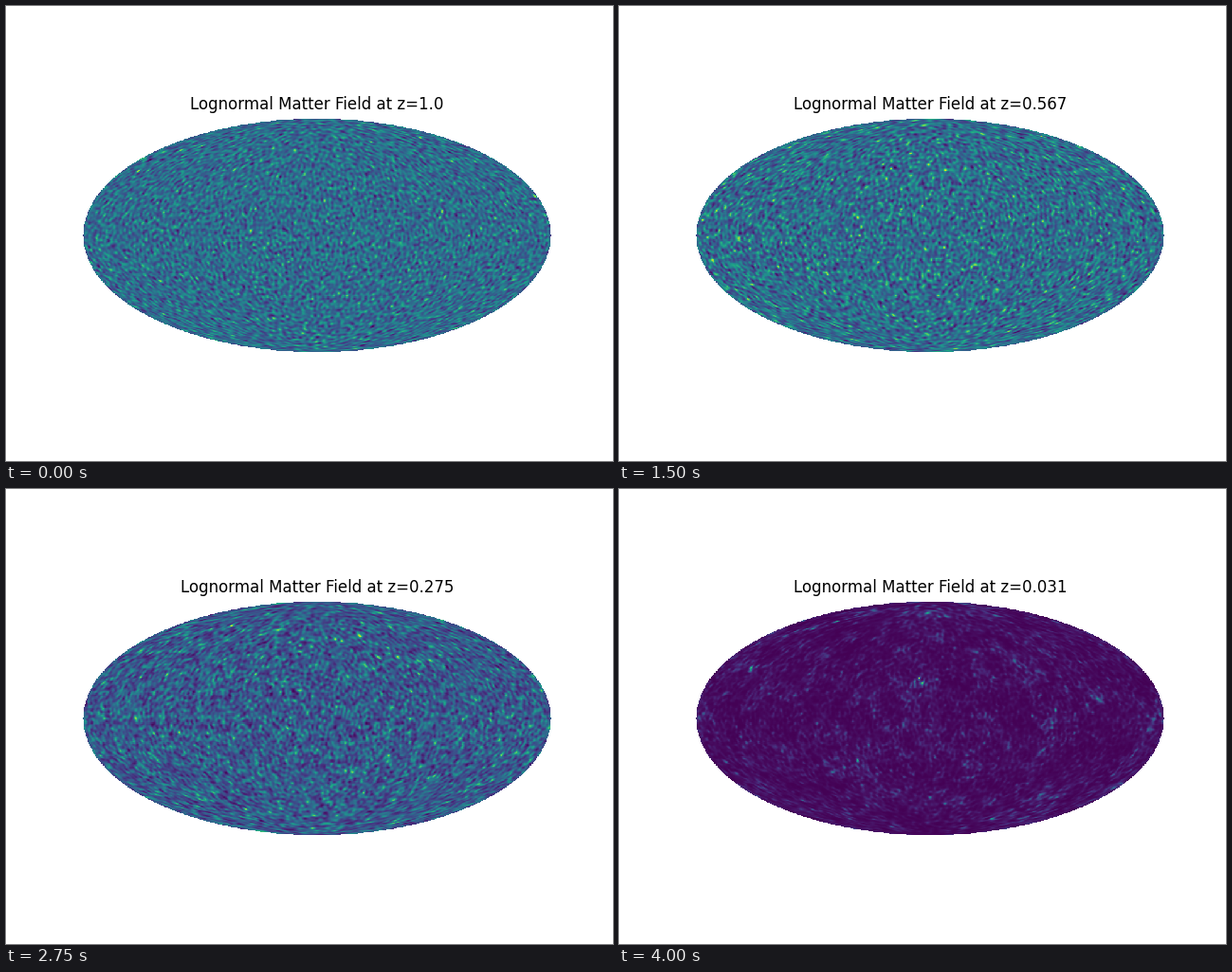
Recreate the animation shown at these times as a matplotlib script. Size 640x480 px, loop 4250 ms.

```python
import numpy as np
import matplotlib.pyplot as plt
from matplotlib.animation import FuncAnimation

SHELLS, STEP = 17, 200.0      # shell count and thickness in Mpc
LMAX, NLAT, NLON = 128, 400, 800
HUBBLE, OMEGA_M = 4282.7, 0.302

# Comoving distance tabulated against redshift
z_tab = np.linspace(0, 1.2, 6001)
inv_e = 1 / np.sqrt(OMEGA_M * (1 + z_tab) ** 3 + 1 - OMEGA_M)
dist_tab = HUBBLE * np.append(
    0, np.cumsum((inv_e[1:] + inv_e[:-1]) / 2 * np.diff(z_tab)))


def legendre_tables(x):
    """Normalised associated Legendre functions, one (l, x) array per m."""
    s = np.sqrt(1 - x * x)
    p_mm = np.ones_like(x)
    tables = []
    for m in range(LMAX + 1):
        if m:
            p_mm = np.sqrt((2 * m + 1) / (2 * m)) * s * p_mm
        rows = [p_mm, np.sqrt(2 * m + 3) * x * p_mm]
        for l in range(m + 2, LMAX + 1):
            a = np.sqrt((4 * l * l - 1) / (l * l - m * m))
            b = np.sqrt(((l - 1) ** 2 - m * m) / (4 * (l - 1) ** 2 - 1))
            rows.append(a * (x * rows[-1] - b * rows[-2]))
        tables.append(np.array(rows[:LMAX + 1 - m]))
    return tables


lat = (np.arange(NLAT) + 0.5) / NLAT * np.pi - np.pi / 2
LEGENDRE = legendre_tables(np.sin(lat))


def mollweide_lookup(width=800, height=400, edge=2.01):
    """Sphere cell under each image pixel, and the mask of the ellipse."""
    x, y = np.meshgrid(np.linspace(-edge, edge, width),
                       np.linspace(-edge / 2, edge / 2, height))
    inside = x * x / 4 + y * y < 1
    x, y = x[inside], y[inside]
    t = np.arcsin(y)
    phi = np.arcsin(np.clip((2 * t + np.sin(2 * t)) / np.pi, -1, 1))
    lon = np.pi / 2 * x / np.cos(t)
    row = ((phi / np.pi + 0.5) * NLAT).astype(int).clip(0, NLAT - 1)
    col = ((lon / (2 * np.pi) + 0.5) * NLON).astype(int) % NLON
    return inside, row, col


INSIDE, ROW, COL = mollweide_lookup()


def shell(i):
    """Effective distance and redshift of shell i, farthest first."""
    mid = STEP * (SHELLS - 1 - i + 0.5)
    dist = mid + 33 * (100 / mid) ** 1.2
    return dist, np.interp(dist, dist_tab, z_tab)


def lognormal_field(dist, seed):
    rng = np.random.default_rng(seed)
    k = np.arange(LMAX + 1) / dist
    amp = np.sqrt(k / (1 + (k / 0.02) ** 2) ** 1.2)
    modes = np.zeros((NLAT, NLON // 2 + 1), complex)
    for m, table in enumerate(LEGENDRE):
        re, im = rng.normal(size=(2, LMAX + 1 - m))
        alm = re if m == 0 else (re + 1j * im) / np.sqrt(2)
        modes[:, m] = (alm * amp[m:]) @ table
    g = np.fft.irfft(modes, NLON, axis=1)
    weight = np.cos(lat)[:, None]
    g /= np.sqrt((g * g * weight).sum() / (weight.sum() * NLON))
    sigma = 0.75 * (133 / dist) ** 0.57
    return np.exp(sigma * g - sigma ** 2 / 2) - 1


fig = plt.figure(figsize=(6.4, 4.8), dpi=100, facecolor="white")
ax = fig.add_axes([0.125, 0.11, 0.775, 0.77])
ax.axis("off")
image = np.full(INSIDE.shape, np.nan)
sky = ax.imshow(image, cmap="viridis", origin="lower",
                interpolation="nearest", extent=(-2.01, 2.01, -1.005, 1.005))
ax.set_xlim(-2.01, 2.01)
ax.set_ylim(-1.01, 1.01)
title = ax.set_title("", fontsize=12, family="DejaVu Sans")


def draw(i):
    dist, z = shell(i)
    field = lognormal_field(dist, 40 + i)
    image[INSIDE] = field[ROW, COL]
    sky.set_data(np.ma.masked_invalid(image))
    sky.set_clim(field.min(), field.max())
    title.set_text(f"Lognormal Matter Field at z={round(float(z), 3)}")
    return sky, title


anim = FuncAnimation(fig, draw, frames=SHELLS, interval=250,
                     repeat=True, repeat_delay=0)
plt.show()
```
